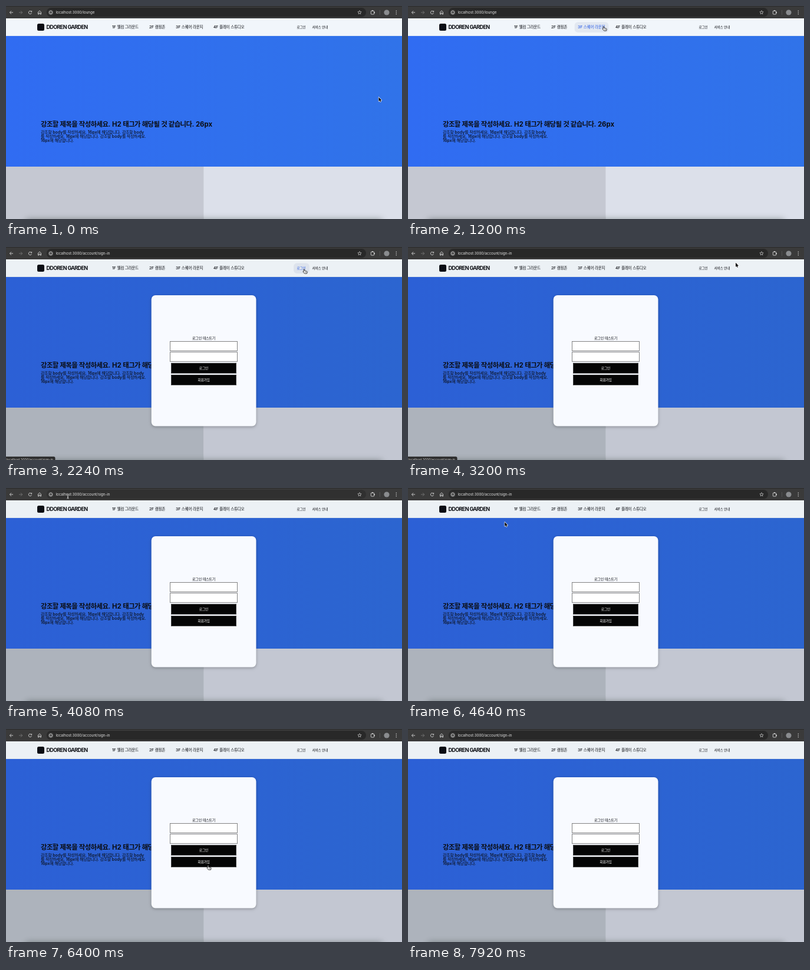
These frames come from a looping animation (672 by 362 pixels, 8 s). An HTML page with a canvas:

```html
<!DOCTYPE html>
<html lang="ko">
<head>
<meta charset="utf-8">
<style>
  html, body { margin: 0; width: 100%; height: 100%; overflow: hidden; background: #dce0eb; }
  canvas { display: block; width: 672px; height: 362px; }
</style>
</head>
<body>
<canvas id="stage"></canvas>
<script>
const W = 672, H = 362, LOOP = 8000, STEP = 80;
const OPEN_AT = 2240;
const canvas = document.getElementById('stage');
const ctx = canvas.getContext('2d');
const dpr = window.devicePixelRatio || 1;
canvas.width = W * dpr;
canvas.height = H * dpr;

const FONT = 'Inter, "Noto Sans CJK KR", "Noto Sans CJK", sans-serif';
const INK = '#0b0d12', BLUE = '#2a5de6';

const links = [
  { text: '1F 웰컴 그라운드', x: 180, w: 45, size: 6.65 },
  { text: '2F 캠핑존', x: 243, w: 28, size: 6.65 },
  { text: '3F 스퀘어 라운지', x: 288, w: 47, size: 6.65 },
  { text: '4F 플레이 스튜디오', x: 352, w: 52, size: 6.65 },
  { text: '로그인', x: 493.5, w: 16, size: 5.72 },
  { text: '서비스 안내', x: 519.5, w: 27, size: 5.72 }
];

// Pointer path: time, x, y
const path = [
  [0, 632.5, 155], [160, 632.5, 155], [720, 410, 60], [1040, 325, 36],
  [1200, 332, 34.5], [1440, 345, 35], [1920, 502, 38], [2160, 506, 37.5],
  [2800, 506, 37.5], [3280, 560, 26], [3840, 130, 13], [4080, 105, 14.5],
  [4400, 105, 14.5], [5040, 292, 152], [5200, 298, 161.5], [5440, 312, 170],
  [5920, 342, 226], [6480, 343, 232], [6960, 334, 238]
];
const POINTER_END = 7200;

function pointerAt(t) {
  const i = path.findIndex(p => p[0] > t);
  if (i < 0) return path[path.length - 1].slice(1);
  const [t0, x0, y0] = path[i - 1], [t1, x1, y1] = path[i];
  const u = (t - t0) / (t1 - t0), k = u * u * (3 - 2 * u);
  return [x0 + (x1 - x0) * k, y0 + (y1 - y0) * k];
}

const inside = (px, py, x, y, w, h) => px >= x && px <= x + w && py >= y && py <= y + h;

function rect(x, y, w, h, fill) {
  ctx.fillStyle = fill;
  ctx.fillRect(x, y, w, h);
}

function round(x, y, w, h, r, fill) {
  ctx.beginPath();
  ctx.roundRect(x, y, w, h, r);
  ctx.fillStyle = fill;
  ctx.fill();
}

function line(color, width, ...pts) {
  ctx.beginPath();
  pts.forEach(([x, y], i) => i ? ctx.lineTo(x, y) : ctx.moveTo(x, y));
  ctx.strokeStyle = color;
  ctx.lineWidth = width;
  ctx.stroke();
}

function disc(x, y, r, fill) {
  ctx.beginPath();
  ctx.arc(x, y, r, 0, 7);
  ctx.fillStyle = fill;
  ctx.fill();
}

function ring(x, y, r, color, from = 0, to = 7) {
  ctx.beginPath();
  ctx.arc(x, y, r, from, to);
  ctx.strokeStyle = color;
  ctx.lineWidth = 0.9;
  ctx.stroke();
}

// Hangul runs are set slightly tighter than Latin ones.
function text(str, x, y, size, { weight = 500, color = INK, center = false, track = 0 } = {}) {
  ctx.font = `${weight} ${size}px ${FONT}`;
  ctx.fillStyle = color;
  const runs = str.match(/[가-힣]+|[^가-힣]+/g).map(s => {
    const gap = (/[가-힣]/.test(s) ? -0.05 : track) * size + 'px';
    ctx.letterSpacing = gap;
    return { s, gap, w: ctx.measureText(s).width };
  });
  if (center) x -= runs.reduce((sum, r) => sum + r.w, 0) / 2;
  for (const r of runs) {
    ctx.letterSpacing = r.gap;
    ctx.fillText(r.s, x, y);
    x += r.w;
  }
}

function browserBar(url, hover) {
  const c = '#d4d4d4';
  rect(0, 0, W, 21, '#3a3a3a');
  rect(0, 0, W, 1, '#2b2b2b');
  round(69, 3, 542, 15.5, 7.75, hover ? '#303030' : '#282828');

  line(c, 0.9, [12, 11], [6.5, 11]);
  line(c, 0.9, [9, 8.3], [6.3, 11], [9, 13.7]);
  line('#777', 0.9, [22, 11], [27.5, 11]);
  line('#777', 0.9, [25, 8.3], [27.7, 11], [25, 13.7]);
  ring(41, 11, 2.6, c, 0.3, 5.5);
  line(c, 0.9, [43.6, 8], [43.6, 10], [41.7, 10]);
  line(c, 0.9, [54.5, 10.3], [57, 8], [59.5, 10.3], [59.5, 14], [58, 14], [58, 11.8],
    [56, 11.8], [56, 14], [54.5, 14], [54.5, 10]);

  disc(76, 11, 5, '#3b3b3b');
  ring(76, 11, 2.8, c);
  line(c, 0.8, [76, 10.6], [76, 12.6]);
  text(url, 84.5, 13.2, 6.2, { weight: 400, color: '#e3e3e3' });

  const star = [];
  for (let i = 0; i <= 10; i++) {
    const a = i * Math.PI / 5 - Math.PI / 2, r = i % 2 ? 1.5 : 3.3;
    star.push([600 + r * Math.cos(a), 11 + r * Math.sin(a)]);
  }
  line(c, 0.7, ...star);

  ctx.beginPath();
  ctx.roundRect(619.3, 8.3, 5.4, 5.8, 0.8);
  ctx.strokeStyle = c;
  ctx.lineWidth = 0.9;
  ctx.stroke();
  disc(622, 8, 1.1, c);
  disc(625, 11.2, 1.1, c);
  line('#5a5a5a', 0.8, [634.5, 7], [634.5, 15]);
  disc(646, 11, 4.6, '#8a8c8f');
  [8.3, 11, 13.7].forEach(y => disc(662.3, y, 0.75, c));
}

function header(open, hovered) {
  rect(0, 21, W, 30, open ? '#ecf1f5' : '#f1f6fb');
  rect(0, 50.4, W, 0.6, open ? '#d3dce8' : '#dbe5f3');
  round(53, 30, 12, 12, 2.5, '#0a0d14');
  text('DDOREN GARDEN', 68.5, 39.2, 9, { weight: 700, track: -0.07 });
  for (const l of links) {
    const on = l === hovered;
    if (on) round(l.x - 5.3, 27.3, l.w + 10.6, 17.6, 5.5, open ? '#dde3ec' : '#e2e8f1');
    text(l.text, l.x, l.size > 6 ? 38.4 : 38, l.size, { color: on ? BLUE : INK });
  }
}

function page(open) {
  const g = ctx.createLinearGradient(0, 0, W, 0);
  g.addColorStop(0, open ? '#2c60d6' : '#306cf2');
  g.addColorStop(1, open ? '#2c65d0' : '#3073e9');
  rect(0, 51, W, 222, g);
  rect(0, 273, 335.5, 89, open ? '#adb3bc' : '#c5c8d2');
  rect(335.5, 273, 336.5, 89, open ? '#c3c7d2' : '#dce0ea');

  text('강조할 제목을 작성하세요. H2 태그가 해당될 것 같습니다. 26px', 59, 205.2, 11.4, { weight: 700 });
  ['강조할 body를 작성하세요. 16px에 해당합니다. 강조할 body',
   '를 작성하세요. 16px에 해당합니다. 강조할 body를 작성하세요.',
   '16px에 해당합니다.'].forEach((s, i) => text(s, 59, 217.4 + i * 7.04, 7.04));

  ctx.save();
  ctx.shadowColor = 'rgba(60,70,65,0.55)';
  ctx.shadowBlur = 12 * dpr;
  rect(34, 363, 604, 20, '#555');
  ctx.restore();
}

function button(label, y) {
  rect(280, y, 111, 18, '#050505');
  ctx.strokeStyle = '#4c4c4c';
  ctx.lineWidth = 0.9;
  ctx.strokeRect(280.6, y + 0.6, 109.8, 16.8);
  text(label, 335.5, y + 10.8, 5.9, { color: '#fff', center: true });
}

function dialog() {
  ctx.save();
  ctx.shadowColor = 'rgba(0,0,0,0.28)';
  ctx.shadowBlur = 5 * dpr;
  ctx.shadowOffsetY = 1.5 * dpr;
  round(246.7, 82, 177.8, 222.6, 7, '#f8faff');
  ctx.restore();
  text('로그인 테스트기', 335.5, 157.2, 6.16, { center: true });
  for (const y of [160.5, 178.7]) {
    rect(278.5, y, 114, 16, '#fff');
    ctx.strokeStyle = '#767676';
    ctx.lineWidth = 0.9;
    ctx.strokeRect(278.5, y, 114, 16);
  }
  button('로그인', 197);
  button('회원가입', 217);
}

function statusBar() {
  round(-4, 356.3, 87.5, 12, 2.5, '#2c2c2c');
  text('localhost:3000/account/sign-in', 0.5, 362.6, 5.35, { weight: 400, color: '#d2d2d2' });
}

const arrow = new Path2D('M0 0V7L1.6 5.6L2.7 8L3.9 7.5L2.9 5.2H5Z');
const hand = new Path2D('M-.8 .6Q0-.6 .8 .6V3L4.6 3.8Q5.3 4 5.2 5L4.6 7.6H.6L-2 4.6Q-2.2 3.5-.8 4.2Z');
const beam = new Path2D('M-1.6-3.6Q0-3.6 0-2.8Q0-3.6 1.6-3.6M0-2.8V2.8M-1.6 3.6Q0 3.6 0 2.8Q0 3.6 1.6 3.6M-.8 1H.8');

function drawPointer(kind, x, y) {
  ctx.save();
  ctx.translate(x, y);
  ctx.lineJoin = 'round';
  if (kind === 'beam') {
    const dark = y < 20;
    ctx.strokeStyle = dark ? '#222' : '#fff';
    ctx.lineWidth = 1.8;
    ctx.stroke(beam);
    ctx.strokeStyle = dark ? '#f2f2f2' : '#111';
    ctx.lineWidth = 0.9;
    ctx.stroke(beam);
  } else if (kind === 'hand') {
    ctx.fillStyle = '#fff';
    ctx.fill(hand);
    ctx.strokeStyle = '#111';
    ctx.lineWidth = 0.8;
    ctx.stroke(hand);
    [1.3, 2.6, 3.8].forEach(k => line('#111', 0.4, [k, 4.8], [k, 6.4]));
  } else {
    ctx.strokeStyle = '#fff';
    ctx.lineWidth = 1.2;
    ctx.stroke(arrow);
    ctx.fillStyle = '#050505';
    ctx.fill(arrow);
  }
  ctx.restore();
}

function draw(t) {
  const open = t >= OPEN_AT;
  const [x, y] = pointerAt(t);
  const hovered = links.find(l => inside(x, y, l.x - 5.3, 27.3, l.w + 10.6, 17.6));
  const onUrl = inside(x, y, 69, 3, 542, 15.5);
  const onField = open && inside(x, y, 278, 150, 115, 45);
  const onButton = open && inside(x, y, 280, 197, 111, 38);

  ctx.setTransform(dpr, 0, 0, dpr, 0, 0);
  page(open);
  header(open, hovered);
  if (open) dialog();
  browserBar('localhost:3000/' + (open ? 'account/sign-in' : 'lounge'), onUrl);
  if (t >= 2000 && t < 3440) statusBar();
  if (t < POINTER_END) {
    drawPointer(onUrl || onField ? 'beam' : hovered || onButton ? 'hand' : 'arrow', x, y);
  }
}

const start = performance.now();
function tick() {
  const t = (performance.now() - start) % LOOP;
  draw(Math.floor(t / STEP) * STEP);
  requestAnimationFrame(tick);
}
tick();
</script>
</body>
</html>
```
